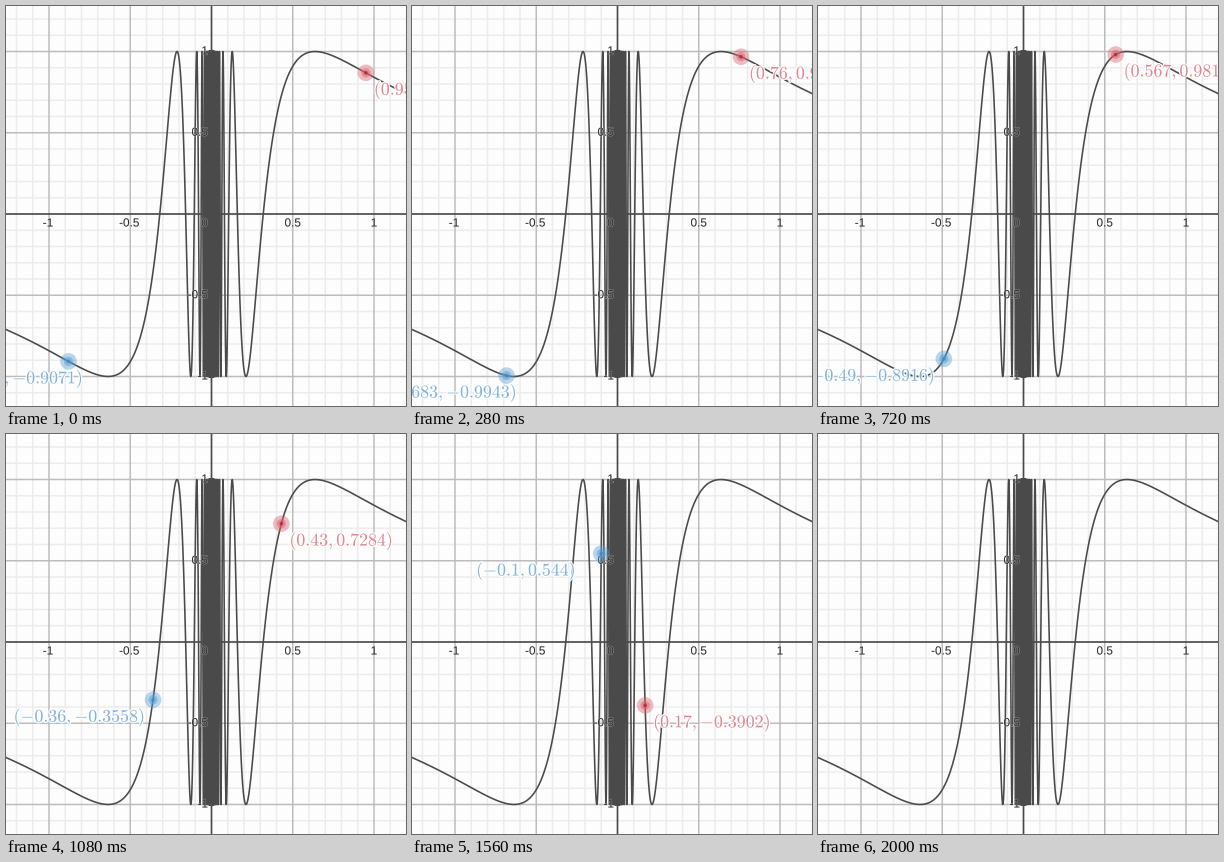
A matplotlib script that plays this animation: 400 px wide and 400 px high, repeating every 2080 ms.

```python
import matplotlib.pyplot as plt
import numpy as np
from matplotlib import patheffects
from matplotlib.animation import FuncAnimation
from matplotlib.patches import Circle

SIZE, DPI, STEP, LOOP = 400, 100, 40, 2080
PT = 72 / DPI
CX, CY, UNIT = 205.5, 208.0, 162.5
RED, BLUE = "#d9636f", "#5a9ed4"

# The drag is sampled at an uneven pace, then both points vanish
HOLDS = [40] + [80, 40] * 4 + [40] + [80] * 2 + [120] * 8 + [40, 80, 120]
JUMPS = np.cumsum([0] + HOLDS)
VANISH = 2000

# Time, red x, blue x
KEYS = np.array([(0, 0.95, -0.88), (280, 0.76, -0.683), (560, 0.64, -0.57),
                 (720, 0.567, -0.49), (1080, 0.43, -0.36), (1560, 0.17, -0.1),
                 (1720, 0.13, -0.05), (1920, 0.07, -0.01)])

plt.rcParams.update({"font.family": "Liberation Sans",
                     "mathtext.fontset": "cm",
                     "path.simplify": False})

fig = plt.figure(figsize=(SIZE / DPI, SIZE / DPI), dpi=DPI,
                 facecolor="#fdfdfd")
ax = fig.add_axes([0, 0, 1, 1])
ax.set_xlim(0, SIZE)
ax.set_ylim(SIZE, 0)
ax.axis("off")


def px(x):
    return CX + UNIT * x


def py(y):
    return CY - UNIT * y


def halo(width, alpha):
    return [patheffects.withStroke(linewidth=width * PT, foreground="white",
                                   alpha=alpha)]


def draw_grid():
    for k in range(-13, 14):
        if k == 0:
            color, width, z = "#4a4a4a", 1.7, 3
        elif k % 5 == 0:
            color, width, z = "#bcbcbc", 1.5, 2
        else:
            color, width, z = "#ececec", 1.5, 1
        style = dict(color=color, lw=width * PT, zorder=z, snap=False)
        ax.axvline(px(k / 10), **style)
        ax.axhline(py(k / 10), **style)


def draw_curve():
    u = np.linspace(0.75, 200, 4500)
    for side in (-1, 1):
        ax.plot(px(side / u), py(side * np.sin(u)), color="#4a4a4a",
                lw=1.6 * PT, zorder=4, snap=False)


def draw_ticks():
    style = dict(fontsize=11.8 * PT, color="#303030", va="center", zorder=5,
                 path_effects=halo(1.2, 0.35))
    for v in (-1, -0.5, 0.5, 1):
        ax.text(px(v) - (v < 0), 217.5, f"{v:g}", ha="center", **style)
        ax.text(202, py(v), f"{v:g}", ha="right", **style)
    ax.text(198.5, 217.5, "0", ha="center", **style)


class Marker:
    def __init__(self, color, core):
        self.dots = [Circle((0, 0), r, color=c, alpha=a, lw=0, zorder=6)
                     for r, c, a in ((8.3, color, 0.42), (4.6, color, 0.5),
                                     (1.9, core, 0.75))]
        for dot in self.dots:
            ax.add_patch(dot)
        self.label = ax.text(0, 0, "", color=color, fontsize=17.9 * PT,
                             alpha=0.75, ha="left", va="center", zorder=7,
                             path_effects=halo(2.6, 0.9))

    def place(self, x, shift):
        y = np.sin(1 / x)
        for dot in self.dots:
            dot.center = (px(x), py(y))
        self.label.set_position((px(x) + shift, py(y) + 17.4))
        self.label.set_text(f"$({number(x, 3)},{number(y, 4)})$")

    def show(self, on):
        for part in (*self.dots, self.label):
            part.set_visible(on)


def number(v, digits):
    return f"{round(float(v), digits):g}".replace("-", "{-}")


def x_at(t, column):
    x = np.interp(t, KEYS[:, 0], KEYS[:, column])
    return x if t in KEYS[:, 0] else round(x, 2)


def blue_shift(t):
    return -141 + 24 * (t / 860 - 1) ** 2


draw_grid()
draw_curve()
draw_ticks()
red = Marker(RED, "#b8202f")
blue = Marker(BLUE, "#3d88c8")


def update(i):
    now = i * STEP
    t = JUMPS[JUMPS <= now].max()
    red.place(x_at(t, 1), 8)
    blue.place(x_at(t, 2), blue_shift(t))
    for marker in (red, blue):
        marker.show(now < VANISH)
    return []


anim = FuncAnimation(fig, update, frames=LOOP // STEP, interval=STEP,
                     repeat=True, repeat_delay=0, blit=False)
plt.show()
```
